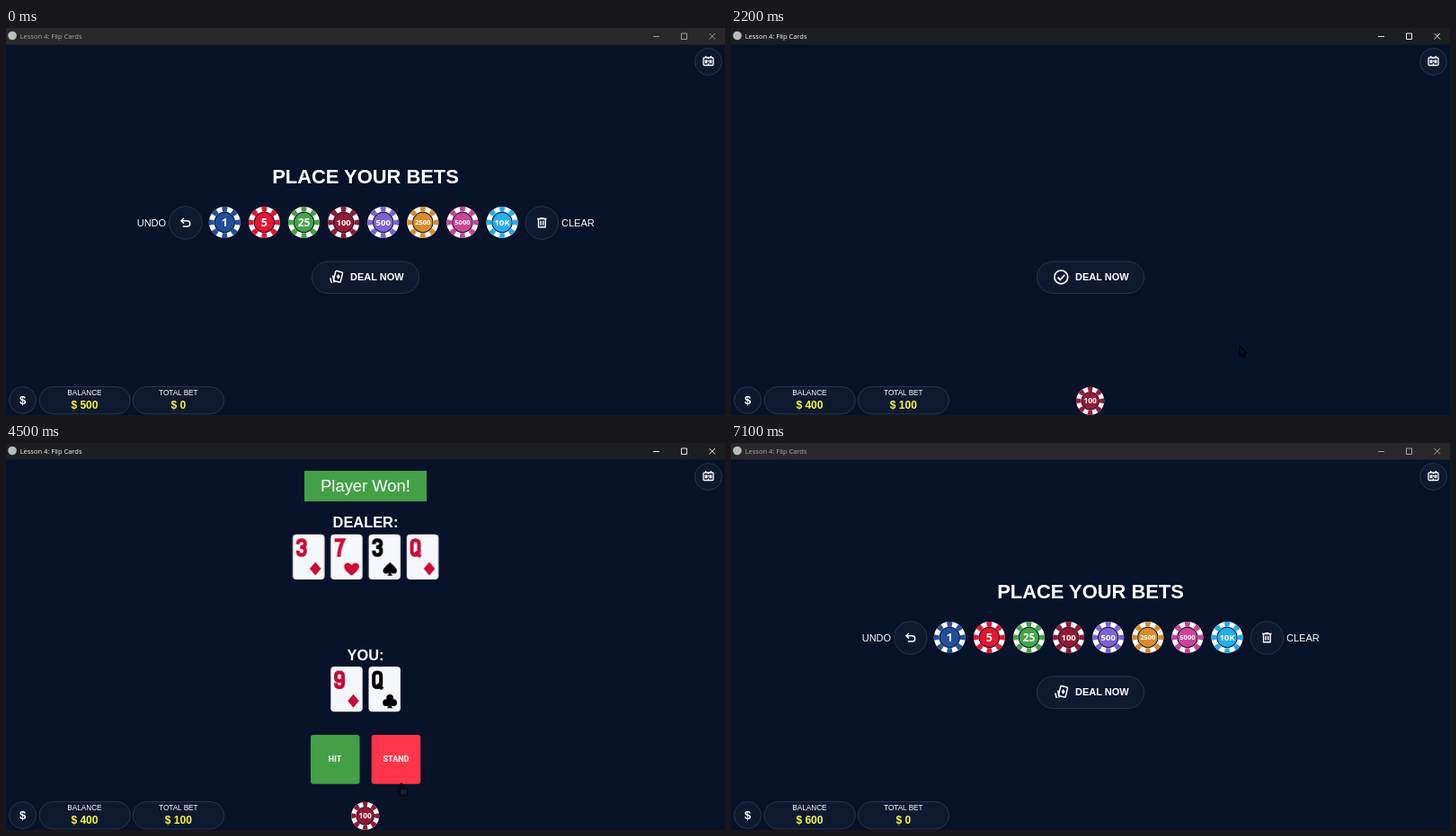
An HTML page for the animation above (7200 ms loop, 800 by 431 pixels).

```html
<!DOCTYPE html>
<html lang="en">
<head>
<meta charset="utf-8">
<title>Card table</title>
<style>
html, body { margin: 0; width: 100%; height: 100%; overflow: hidden; background: #081229; }
svg { display: block; width: 100vw; height: 100vh; font-family: "Liberation Sans", Arial, sans-serif; fill: #fff; }
.mid { text-anchor: middle; }
.bold { font-weight: 700; }
.line { fill: none; stroke: #fff; }
.pill { fill: #0f1930; stroke: #2c364c; }
.label { font-size: 8.2px; }
.money { font: 700 12px "Liberation Sans", Arial, sans-serif; fill: #f5f53a; }
.chips text { font-family: "Open Sans", sans-serif; font-weight: 700; text-anchor: middle; }
.red { color: #cc0a35; }
.black { color: #000; }
.rank { fill: none; stroke: currentColor; stroke-width: 4; }
.btn { font: 700 9px Roboto, sans-serif; text-anchor: middle; }
.title { font: 7.5px "Open Sans", sans-serif; }
.cursor path { stroke: #000; stroke-width: 1.1; stroke-linejoin: round; }

/* one loop is 7200 ms: 1% = 72 ms */
.anim { animation: 7200ms step-end infinite; }
.idle { animation-name: idle; }
.active { animation-name: active; }
.bets { animation-name: bets; }
.wait { animation-name: wait; }
.deal { animation-name: deal; }
.hover { animation-name: hover; }
.start { animation-name: start; }
.staked { animation-name: staked; }
.paid { animation-name: paid; }
.table { animation-name: table; }
.hand { animation-name: shift; }
.third { animation-name: third; }
.fourth { animation-name: fourth; }
.won { animation-name: won; }
.cursor { animation-name: move; }
.arrow { animation-name: arrow; }
.point { animation-name: point; }

@keyframes idle { 0%, 98.61% { opacity: 1 } 15.27% { opacity: 0 } 100% { opacity: 1 } }
@keyframes active { 0%, 98.61%, 100% { opacity: 0 } 15.27% { opacity: 1 } }
@keyframes bets { 0%, 83.33%, 100% { opacity: 1 } 22.22% { opacity: 0 } }
@keyframes wait { 0%, 33.33%, 100% { opacity: 0 } 22.22% { opacity: 1 } }
@keyframes deal { 0%, 83.33%, 100% { opacity: 1 } 33.33% { opacity: 0 } }
@keyframes hover { 0%, 25%, 100% { opacity: 0 } 19.44% { opacity: 1 } }
@keyframes start { 0%, 100% { opacity: 1 } 15.27% { opacity: 0 } }
@keyframes staked { 0%, 83.33%, 100% { opacity: 0 } 15.27% { opacity: 1 } }
@keyframes paid { 0% { opacity: 0 } 83.33%, 100% { opacity: 1 } }
@keyframes table {
  0%, 83.33%, 100% { opacity: 0 }
  33.33% { opacity: .35 }
  34.72% { opacity: .75 }
  36.11% { opacity: 1 }
}
@keyframes shift {
  0%, 83.33%, 100% { transform: translateX(0) }
  52.77% { transform: translateX(-21.1px) }
  55.55% { transform: translateX(-42.3px) }
}
@keyframes third { 0%, 83.33%, 100% { opacity: 0 } 52.77% { opacity: 1 } }
@keyframes fourth { 0%, 83.33%, 100% { opacity: 0 } 55.55% { opacity: 1 } }
@keyframes won { 0%, 83.33%, 100% { opacity: 0 } 58.33% { opacity: 1 } }
@keyframes move {
  0% { transform: translate(325px, 425px) }
  9.72% { transform: translate(325px, 425px); animation-timing-function: steps(3) }
  13.88% { transform: translate(376px, 222px) }
  15.27% { transform: translate(376px, 222px); animation-timing-function: steps(3) }
  19.44% { transform: translate(416px, 286px) }
  22.22% { transform: translate(416px, 286px); animation-timing-function: steps(6) }
  30.55% { transform: translate(566px, 354px) }
  41.66% { transform: translate(566px, 354px); animation-timing-function: steps(6) }
  50% { transform: translate(440px, 379.5px) }
  70.83% { transform: translate(441px, 379.5px) }
  83.33% { transform: translate(441px, 379.5px); animation-timing-function: steps(5) }
  90.27%, 100% { transform: translate(415px, 432px) }
}
@keyframes arrow {
  0%, 12.5%, 48.61%, 90.27%, 100% { opacity: 0 }
  9.72%, 25%, 83.33% { opacity: 1 }
}
@keyframes point {
  0%, 25%, 83.33%, 100% { opacity: 0 }
  12.5%, 48.61% { opacity: 1 }
}
</style>
</head>
<body>
<svg viewBox="0 0 800 431" preserveAspectRatio="none">
  <defs>
    <g id="chip">
      <circle r="14.6" fill="none" stroke="#fff" stroke-width="5.8"/>
      <circle r="14.6" fill="none" stroke="currentColor" stroke-width="5.8" pathLength="16" stroke-dasharray="1" stroke-dashoffset=".5"/>
      <circle r="10.7" fill="currentColor"/>
    </g>
    <rect id="card" width="35.4" height="50.2" rx="4" fill="#f6f7fa"/>
    <path id="three" class="rank" d="M2 6.6V5.6C2 3 3.5 2 6 2s4 1.2 4 3.8v.6C10 8.8 8.5 9.7 4.6 9.7 8.5 9.7 10 10.7 10 13v1.6C10 17.4 8.5 18.6 6 18.6s-4-1.2-4-4v-1"/>
    <path id="seven" class="rank" d="M.3 2H10C7 8 5.4 13 5 20.6"/>
    <path id="nine" class="rank" d="M10 8V5.6C10 3 8.5 2 6 2S2 3 2 5.6V8c0 2.5 1.4 3.6 3.8 3.6S10 10.500 10 8v6.600c0 2.800-1.500 4-4 4s-4-1.200-4-4v-.8"/>
    <path id="queen" class="rank" d="M2 6C2 3.300 3.500 2 6 2s4 1.300 4 4v8.600c0 2.700-1.500 4-4 4s-4-1.300-4-4ZM6.500 14.500L11.600 20.500"/>
    <path id="diamond" fill="currentColor" d="M0-7.500L6.300 0 0 7.500-6.300 0Z"/>
    <path id="heart" fill="currentColor" d="M0 7.500C-5 3.500-8.300 1-8.300-2.700-8.300-7.300-2.500-8.300 0-4 2.500-8.300 8.300-7.300 8.300-2.700 8.300 1 5 3.500 0 7.500Z"/>
    <path id="spade" fill="currentColor" d="M0-7.500C4-3.500 7.700-1 7.700 2.200 7.700 5.700 3 6.500 1 3.700 1.200 5.600 2 6.800 3.500 7.500H-3.500C-2 6.800-1.200 5.600-1 3.700-3 6.500-7.700 5.700-7.700 2.200-7.700-1-4-3.500 0-7.500Z"/>
    <g id="club" fill="currentColor">
      <circle cy="-3.700" r="3.900"/><circle cx="-4" cy="1.700" r="3.900"/><circle cx="4" cy="1.700" r="3.900"/>
      <path d="M-1-2H1C1 4 1.500 6.700 3.500 7.700H-3.500C-1.500 6.700-1 4-1-2Z"/>
    </g>
  </defs>

  <rect width="800" height="431" fill="#081229"/>

  <!-- window bar -->
  <g class="anim idle">
    <rect width="800" height="18.500" fill="#2a2829"/>
    <g opacity=".62"><text class="title" x="15.700" y="11.500">Lesson 4: Flip Cards</text>
    <path class="line" stroke-width=".9" d="M720 9.500h7M751.500 6h6v6.500h-6ZM782.500 6l6.500 6.500m0-6.500l-6.500 6.500"/></g>
  </g>
  <g class="anim active">
    <rect width="800" height="18.500" fill="#1b1f1f"/>
    <text class="title" x="15.700" y="11.500">Lesson 4: Flip Cards</text>
    <path class="line" stroke-width=".9" d="M720 9.500h7M751.500 6h6v6.500h-6ZM782.500 6l6.500 6.500m0-6.500l-6.500 6.500"/>
  </g>
  <circle cx="7" cy="8.500" r="4.800" fill="#b9bcbe"/>

  <!-- score button -->
  <circle class="pill" cx="781.500" cy="37.500" r="15"/>
  <g class="line" stroke-width="1.300">
    <rect x="776" y="33" width="11" height="8.500" rx="1"/>
    <path d="M778.700 31v2M784.300 31v2M781.500 33v1.500M781.500 36v1.500M781.500 39.500v1.500M778.200 36.200h1.600v2.300h-1.600ZM783.200 36.200h1.600v2.300h-1.600Z"/>
  </g>

  <!-- betting -->
  <g class="anim bets">
    <text class="mid bold" x="400" y="173" font-size="21.900">PLACE YOUR BETS</text>
    <text x="145.700" y="220.500" font-size="11">UNDO</text>
    <circle class="pill" cx="199.700" cy="217" r="18.300"/>
    <path class="line" stroke-width="1.500" d="M198 211.800l-3 3 3 3M195.300 214.800h6.300a3 3 0 0 1 0 6.200h-4.800"/>
    <circle class="pill" cx="596.300" cy="217" r="18.300"/>
    <path class="line" stroke-width="1.400" d="M591 212.500h10.500M594.300 211.600h4M592.500 213v8.800h7.600V213M595 214.800v5M597.600 214.800v5"/>
    <text x="618" y="220.500" font-size="11">CLEAR</text>
    <g class="chips">
      <g transform="translate(243.300 216.500)"><use href="#chip" color="#20509c"/><text y="4.400" font-size="12.500">1</text></g>
      <g transform="translate(287.400 216.500)"><use href="#chip" color="#e51632"/><text y="4.400" font-size="12.500">5</text></g>
      <g transform="translate(331.500 216.500)"><use href="#chip" color="#42a548"/><text y="4.200" font-size="12">25</text></g>
      <g transform="translate(375.600 216.500)"><use href="#chip" color="#951936"/><text y="3.300" font-size="9.500">100</text></g>
      <g transform="translate(419.700 216.500)"><use href="#chip" color="#7c61d2"/><text y="3.300" font-size="9.500">500</text></g>
      <g transform="translate(463.800 216.500)"><use href="#chip" color="#d98c2b"/><text y="2.700" font-size="7.500">2500</text></g>
      <g transform="translate(507.900 216.500)"><use href="#chip" color="#cc4497"/><text y="2.700" font-size="7.500">5000</text></g>
      <g transform="translate(552 216.500)"><use href="#chip" color="#25aeea"/><text y="3.300" font-size="9.500">10K</text></g>
    </g>
  </g>

  <g class="anim deal">
    <rect class="pill" x="340.500" y="260" width="119" height="35.500" rx="17.750"/>
    <rect class="anim hover" x="340.500" y="260" width="119" height="35.500" rx="17.750" fill="#1b233a" stroke="#59617a"/>
    <g class="anim bets">
      <rect class="line" x="-4" y="-5.700" width="8" height="11.400" rx="1.200" stroke-width="1.500" transform="translate(369.500 276.800) rotate(14)"/>
      <path d="M369.700 274l2 2.900-2 2.900-2-2.900Z"/>
      <path class="line" stroke-width="1.500" d="M363.700 275.500l1.500 8M360.600 278.500l1.800 5.500"/>
    </g>
    <g class="anim wait line" stroke-width="1.700">
      <circle cx="367.300" cy="277.400" r="7.400"/>
      <path d="M363.500 277.600l2.800 2.800 5-5.400"/>
    </g>
    <text class="bold" x="383" y="280.500" font-size="11">DEAL NOW</text>
  </g>

  <!-- table -->
  <g class="anim table">
    <text class="mid bold" x="400" y="93.700" font-size="16.400">DEALER:</text>
    <g class="anim hand">
      <g class="red" transform="translate(361.300 101.700)"><use href="#card"/><use href="#three" x="3.700" y="4.500"/><use href="#diamond" x="25.200" y="38.300"/></g>
      <g class="red" transform="translate(403.500 101.700)"><use href="#card"/><use href="#seven" x="4" y="4.500"/><use href="#heart" x="23.300" y="38.500"/></g>
      <g class="anim third black"><g transform="translate(445.800 101.700)"><use href="#card"/><use href="#three" x="3.700" y="4.500"/><use href="#spade" x="23.700" y="38.500"/></g></g>
      <g class="anim fourth red"><g transform="translate(488.100 101.700)"><use href="#card"/><use href="#queen" x="3.700" y="4.500"/><use href="#diamond" x="25.200" y="38.300"/></g></g>
    </g>
    <text class="mid bold" x="400" y="241.500" font-size="16.400">YOU:</text>
    <g class="red" transform="translate(361.300 249)"><use href="#card"/><use href="#nine" x="3.700" y="4.500"/><use href="#diamond" x="25.200" y="38.300"/></g>
    <g class="black" transform="translate(403.500 249)"><use href="#card"/><use href="#queen" x="3.700" y="4.500"/><use href="#club" x="23.600" y="38.500"/></g>
    <rect x="339" y="325" width="54.500" height="54.800" rx="3" fill="#43a047"/>
    <text class="btn" x="366" y="355.300">HIT</text>
    <rect x="406.700" y="325" width="54.500" height="54.800" rx="3" fill="#ff354a"/>
    <text class="btn" x="434" y="355.300">STAND</text>
    <g class="anim won">
      <rect x="332" y="31" width="136" height="34" fill="#43a047"/>
      <text class="mid" x="400" y="54.300" font-size="18.400">Player Won!</text>
    </g>
  </g>

  <!-- money -->
  <circle class="pill" cx="18.500" cy="414.500" r="15"/>
  <text class="mid bold" x="18.500" y="419" font-size="13">$</text>
  <rect class="pill" x="37" y="399.500" width="101.300" height="30.300" rx="15.150"/>
  <rect class="pill" x="141.300" y="399.500" width="101.300" height="30.300" rx="15.150"/>
  <text class="mid label" x="87.400" y="409.200">BALANCE</text>
  <text class="mid label" x="191.800" y="409.200">TOTAL BET</text>
  <g class="mid money">
    <g class="anim start"><text x="87.400" y="423.700">$ 500</text><text x="191.800" y="423.700">$ 0</text></g>
    <g class="anim staked"><text x="87.400" y="423.700">$ 400</text><text x="191.800" y="423.700">$ 100</text></g>
    <g class="anim paid"><text x="87.400" y="423.700">$ 600</text><text x="191.800" y="423.700">$ 0</text></g>
  </g>
  <g class="anim staked chips">
    <g transform="translate(399.700 415.300) scale(.89)"><use href="#chip" color="#951936"/><text y="3.300" font-size="9.500">100</text></g>
  </g>

  <g class="anim cursor">
    <path class="anim arrow" fill="#0b1224" d="M0 0V11.500L2.700 9 4.500 13 6.300 12.200 4.500 8.300H8Z"/>
    <path class="anim point" fill="#161d30" d="M-1 1C-1-.5 1-.5 1 1V5L5.500 6C6.500 6.300 7 7 7 8L6 13H0L-3.500 8.500C-4 7.300-2.500 6.500-1 8.200Z"/>
  </g>
</svg>
</body>
</html>
```
